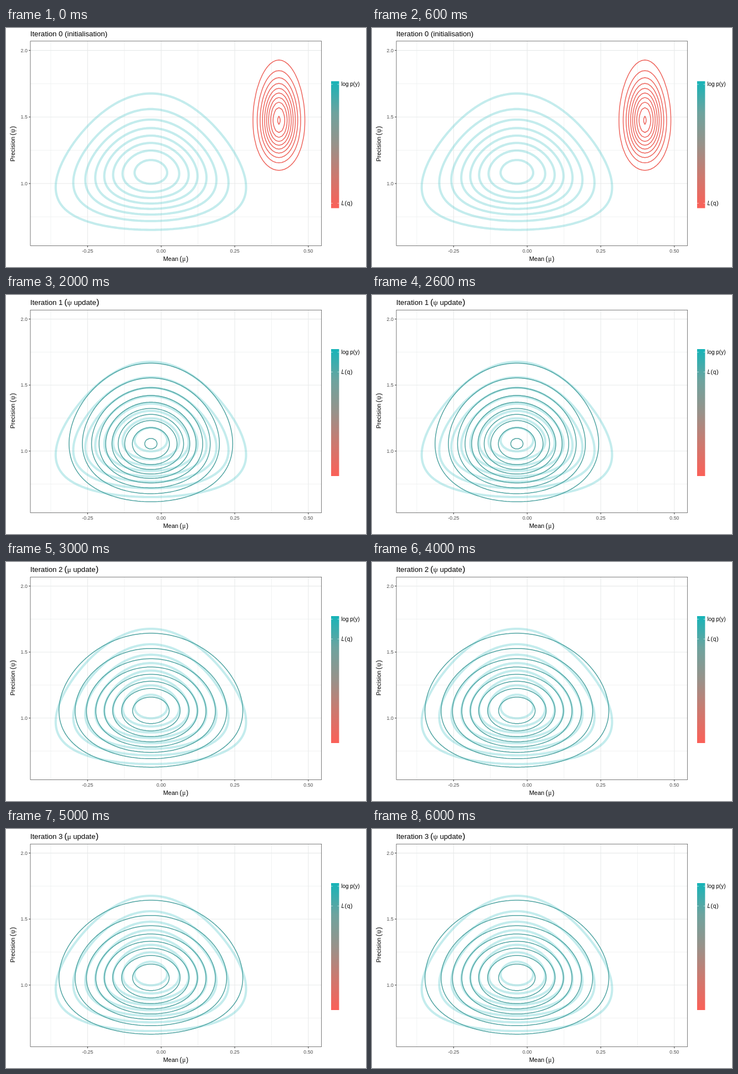
Write an HTML page that moves like this. It is 650x433 px and loops after 7 s.

```html
<!DOCTYPE html>
<html lang="en">
<head>
<meta charset="utf-8">
<title>Variational inference</title>
<style>
  html, body { margin: 0; width: 100%; height: 100%; overflow: hidden; background: #fff; }
  svg { display: block; width: 650px; height: 433px; font-family: "Liberation Sans", Arial, sans-serif; }
  .greek { font-family: "Liberation Serif", "Times New Roman", serif; }
  .tick { font-size: 8.8px; fill: #4d4d4d; }
  .major { stroke: #e8eaea; stroke-width: 1.1; }
  .minor { stroke: #ebeded; stroke-width: .7; }
  .mark { stroke: #333; stroke-width: 1; }
  .contour { fill: none; stroke-linecap: round; stroke-linejoin: round; }
</style>
</head>
<body>
<svg id="stage" viewBox="0 0 650 433">
  <defs>
    <linearGradient id="ramp" x1="0" y1="0" x2="0" y2="1">
      <stop offset="0" stop-color="#16b4b8"/>
      <stop offset=".25" stop-color="#6ea39e"/>
      <stop offset=".5" stop-color="#98928a"/>
      <stop offset=".75" stop-color="#cd796f"/>
      <stop offset="1" stop-color="#fb6058"/>
    </linearGradient>
  </defs>
  <rect width="650" height="433" fill="#fff"/>
  <g id="plot"></g>
</svg>
<script>
const plot = document.getElementById('plot');
const X0 = 280.2, XS = 531.4, LEFT = 44, RIGHT = 569.7, BOTTOM = 394.5;
const STEP = 0.01, COLS = 90, ROWS = 140, MU0 = -0.4, PSI0 = 0.6;
const CENTRE = -0.035;

// Log densities relative to their peaks
const gamma = (psi, c, mode) => c * (Math.log(psi / mode) - psi / mode + 1);
const posterior = (mu, psi) =>
  gamma(psi, 19.5, 1.085) - 20 * psi * (mu - CENTRE) ** 2;
const factored = (m, s, c, mode) => (mu, psi) =>
  gamma(psi, c, mode) - ((mu - m) / s) ** 2 / 2;

// Marching squares at levels 1, 2, 3 ... below the peak
function contours(logDensity, peak) {
  const grid = [];
  for (let j = 0; j <= ROWS; j++) {
    grid.push([]);
    for (let i = 0; i <= COLS; i++)
      grid[j].push(peak * Math.exp(logDensity(MU0 + i * STEP, PSI0 + j * STEP)));
  }
  const corners = [[0, 0], [1, 0], [1, 1], [0, 1]];
  const segments = [];
  for (let j = 0; j < ROWS; j++) for (let i = 0; i < COLS; i++) {
    const v = corners.map(([a, b]) => grid[j + b][i + a]);
    const top = Math.max(...v);
    for (let level = Math.max(1, Math.ceil(Math.min(...v))); level < top; level++) {
      const ends = [];
      for (let k = 0; k < 4; k++) {
        const n = (k + 1) % 4;
        if ((v[k] > level) === (v[n] > level)) continue;
        const t = (level - v[k]) / (v[n] - v[k]);
        const [a, b] = corners[k], [c, d] = corners[n];
        ends.push([MU0 + (i + a + t * (c - a)) * STEP, PSI0 + (j + b + t * (d - b)) * STEP]);
      }
      if (ends.length === 2) segments.push(ends);
    }
  }
  return segments;
}

const target = contours(posterior, 8.55);
const start = contours(factored(0.4, 0.0408, 59, 1.475), 10.13);
const muStep = contours(factored(CENTRE, 0.1291, 59, 1.475), 12.83);
const psiStep = contours(factored(CENTRE, 0.1291, 19, 1.0556), 10.14);
const settled = contours(factored(CENTRE, 0.15, 19, 1.0556), 8.72);

const RED = '#ee655d', GREY = '#779e98', TEAL = '#52a5a3';
const states = [
  { n: 0, curve: start, colour: RED, label: 317.5 },
  { n: 1, sym: 'μ', curve: muStep, colour: GREY, label: 168 },
  { n: 1, sym: 'ψ', curve: psiStep, colour: TEAL, label: 139.5 },
  { n: 2, sym: 'μ', curve: settled, colour: TEAL, label: 139.5 },
  { n: 2, sym: 'ψ', curve: settled, colour: TEAL, label: 139.5 },
  { n: 3, sym: 'μ', curve: settled, colour: TEAL, label: 139.5 },
  { n: 3, sym: 'ψ', curve: settled, colour: TEAL, label: 139.5 }
];

const text = (x, y, size, s, attrs = '') =>
  `<text x="${x}" y="${y}" font-size="${size}" ${attrs}>${s}</text>`;
const line = (x1, y1, x2, y2, cls) =>
  `<line x1="${x1}" y1="${y1}" x2="${x2}" y2="${y2}" class="${cls}"/>`;
const greek = 'class="greek"';

function title({ n, sym }) {
  if (!sym) return text(43.8, 15, 13.2, `Iteration ${n} (initialisation)`);
  const shift = sym === 'ψ' ? 1.2 : 0;
  return text(43.8, 18, 13.2, `Iteration ${n}`) +
    text(105.3, 18, 15.5, '(') + text(110.6, 18, 13.2, sym, greek) +
    text(121.2 + shift, 18, 13.2, 'update') + text(162 + shift, 18, 15.5, ')');
}

function axisTitles() {
  return text(283.7, 422, 11, 'Mean') + text(313.6, 422, 12, '(') +
    text(318.2, 422, 11.5, 'μ', greek) + text(325.3, 422, 12, ')') +
    `<g transform="translate(15.5 242) rotate(-90)">` +
    text(0, 0, 11, 'Precision') + text(47.6, 0, 12, '(') +
    text(52.2, 0, 11.5, 'ψ', greek) + text(60.2, 0, 12, ')') + '</g>';
}

function legend(y, label) {
  const notch = at => `<path d="M587 ${at}h3M598.5 ${at}h3" stroke="#fff" stroke-opacity=".7" stroke-width=".8"/>`;
  return `<rect x="587" y="${y}" width="14.4" height="230" fill="url(#ramp)"/>` +
    notch(y + 5.7) + notch(label) +
    text(605.2, y + 8.8, 10, 'log p(y)') +
    text(605.4, label + 3.6, 10, 'L', 'font-style="italic"') +
    text(611.4, label + 3.6, 11, '(') + text(615.8, label + 3.6, 10, 'q') +
    text(622, label + 3.6, 11, ')');
}

function draw(state) {
  const first = !state.sym;
  const top = first ? 23.8 : 27.2;
  const y1 = first ? 281.8 : 282.8, ys = first ? 241.2 : 239.2;
  const px = mu => X0 + XS * mu;
  const py = psi => y1 - ys * (psi - 1);
  const path = segs => segs.map(s => 'M' + s.map(([mu, psi]) =>
    px(mu).toFixed(2) + ' ' + py(psi).toFixed(2)).join('L')).join('');
  const vline = (v, cls) => line(px(v), top, px(v), BOTTOM, cls);
  const hline = (v, cls) => line(LEFT, py(v), RIGHT, py(v), cls);
  const xs = [-0.25, 0, 0.25, 0.5], ps = [1, 1.5, 2];

  let out = '';
  for (const v of xs) out += vline(v - 0.125, 'minor');
  for (const v of ps) out += hline(v - 0.25, 'minor');
  for (const v of xs) out += vline(v, 'major');
  for (const v of ps) out += hline(v, 'major');
  out += `<path class="contour" d="${path(target)}" stroke="#16b4b8" stroke-opacity=".25" stroke-width="4.1"/>`;
  out += `<path class="contour" d="${path(state.curve)}" stroke="${state.colour}" stroke-width="1.5"/>`;
  out += `<rect x="${LEFT}" y="${top}" width="${RIGHT - LEFT}" height="${BOTTOM - top}" fill="none" stroke="#333" stroke-width=".65"/>`;
  for (const v of xs) {
    out += line(px(v), BOTTOM, px(v), BOTTOM + 2.8, 'mark') +
      text(px(v), 407, 8.8, v.toFixed(2), 'class="tick" text-anchor="middle"');
  }
  for (const v of ps) {
    out += line(LEFT - 2.8, py(v), LEFT, py(v), 'mark') +
      text(38.8, py(v) + 3.1, 8.8, v.toFixed(1), 'class="tick" text-anchor="end"');
  }
  plot.innerHTML = out + title(state) + axisTitles() + legend(first ? 96.4 : 98, state.label);
}

let shown = -1;
function update(ms) {
  const i = Math.floor(ms / 1000) % states.length;
  if (i !== shown) draw(states[shown = i]);
}

const begin = performance.now();
function tick() {
  update(performance.now() - begin);
  requestAnimationFrame(tick);
}
tick();
</script>
</body>
</html>
```
